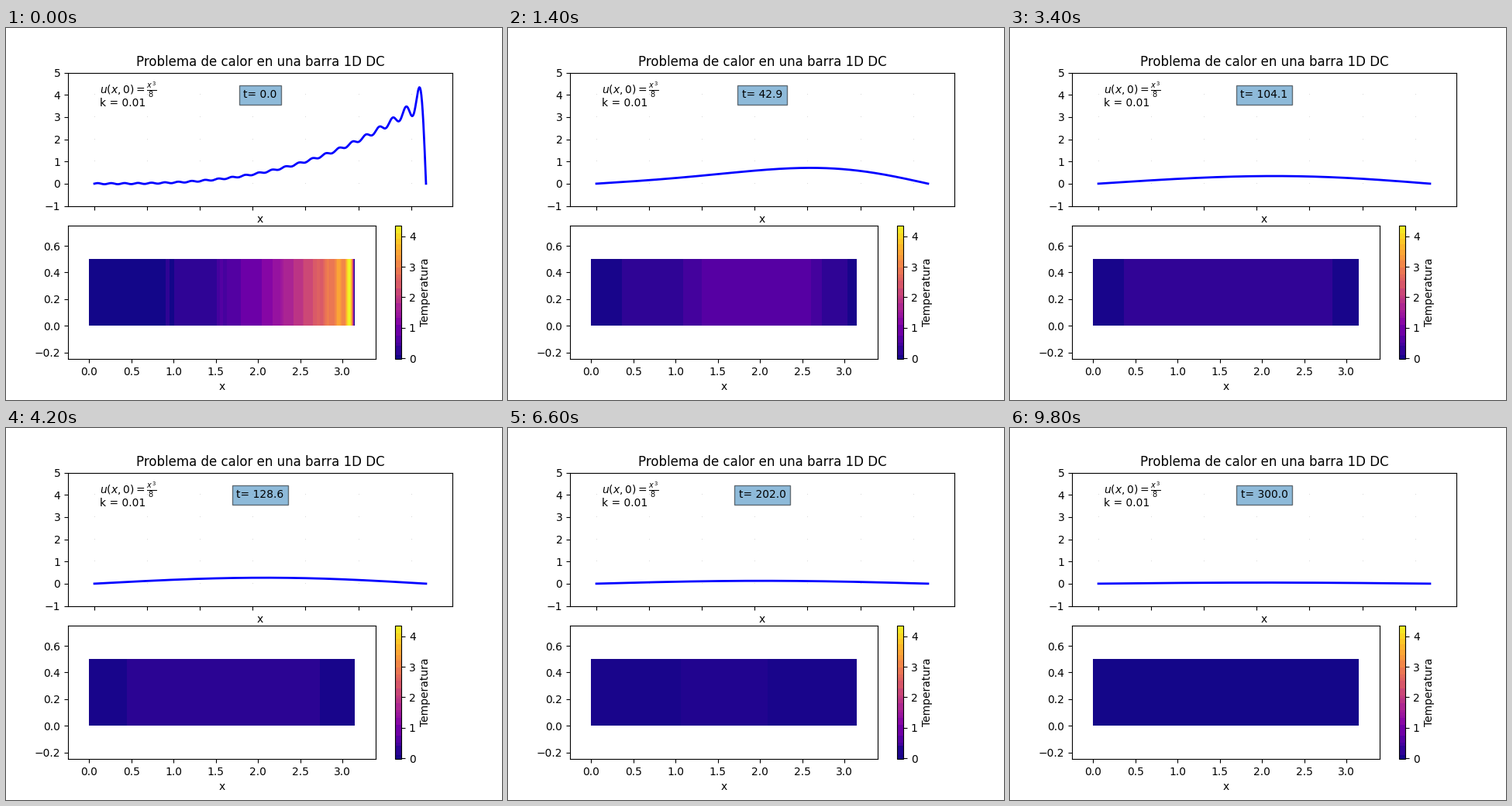
A matplotlib script for the animation above (10 s loop, 640 px wide and 480 px high).

```python
import numpy as np
import matplotlib.pyplot as plt
from matplotlib.animation import FuncAnimation
from matplotlib.colors import ListedColormap

FRAMES, INTERVAL = 50, 200
K, T_END, TERMS = 0.01, 300, 49
BAR_AREA, SCALE_AREA = 86 * 343, 8 * 172  # areas in pixels

plt.rcParams["font.family"] = "DejaVu Sans"

x = np.linspace(0, np.pi, 500)
times = np.linspace(0, T_END, FRAMES)

# Sine series of x^3 / 8 on a rod with cold ends
n = np.arange(1, TERMS + 1)
coef = (-1.0) ** (n + 1) * (np.pi ** 2 / (4 * n) - 1.5 / n ** 3)
modes = np.sin(np.outer(x, n))


def heat(t):
    return modes @ (coef * np.exp(-K * n ** 2 * t))


start = heat(0)
vmin, vmax = start.min(), start.max()

# Plasma shades grouped into coarse colour cells
shades = plt.get_cmap("plasma")(np.arange(256), bytes=True)[:, :3].astype(int)
_, cell = np.unique(shades // [32, 16, 32], axis=0, return_inverse=True)
cell = cell.ravel()


def banded_cmap(u):
    """Each colour cell takes the mean of its shades, weighted by area."""
    index = np.clip((u - vmin) / (vmax - vmin) * 256, 0, 255).astype(int)
    area = np.bincount(index, minlength=256) * BAR_AREA / len(u) + SCALE_AREA / 256
    total = np.bincount(cell, area)
    mean = [np.bincount(cell, area * shades[:, c]) / total for c in range(3)]
    return ListedColormap(np.column_stack(mean)[cell] / 255)


fig, (top, low) = plt.subplots(2, 1, figsize=(6.4, 4.8), dpi=100,
                               gridspec_kw={"hspace": 0.15})

top.set_title("Problema de calor en una barra 1D DC")
top.set_xlim(-0.25, np.pi + 0.25)
top.set_ylim(-1, 5)
top.set_xticks(np.arange(0, 3.1, 0.5))
top.set_yticks(range(-1, 6))
top.tick_params(labelbottom=False)
top.set_xlabel("x")
gx, gy = np.meshgrid(np.arange(0, 3.1, 0.5), np.arange(0, 5))
top.plot(gx.ravel(), gy.ravel(), ",", color="#d9d9d9", zorder=1)
line, = top.plot(x, start, color="blue", lw=2)
top.text(0.05, 4.05, r"$u(x,0)=\frac{x^3}{8}$")
top.text(0.05, 3.5, f"k = {K}")
clock = top.text(np.pi / 2, 4, "", ha="center", va="center",
                 bbox={"facecolor": "tab:blue", "alpha": 0.5})

bar = low.imshow(start[None, :], extent=(0, np.pi, 0, 0.5), aspect="auto",
                 interpolation="nearest", origin="lower",
                 vmin=vmin, vmax=vmax, cmap=banded_cmap(start))
low.set_xlim(-0.25, np.pi + 0.25)
low.set_ylim(-0.25, 0.75)
low.set_xticks(np.arange(0, 3.1, 0.5))
low.set_yticks([-0.2, 0, 0.2, 0.4, 0.6])
low.set_xlabel("x")
fig.colorbar(bar, ax=low, label="Temperatura", ticks=range(5))


def update(i):
    u = heat(times[i])
    line.set_ydata(u)
    clock.set_text(f"t= {times[i]:.1f}")
    bar.set_data(u[None, :])
    bar.set_cmap(banded_cmap(u))
    return line, clock, bar


anim = FuncAnimation(fig, update, frames=FRAMES, interval=INTERVAL,
                     init_func=lambda: update(0), repeat=True, repeat_delay=0)
plt.show()
```
